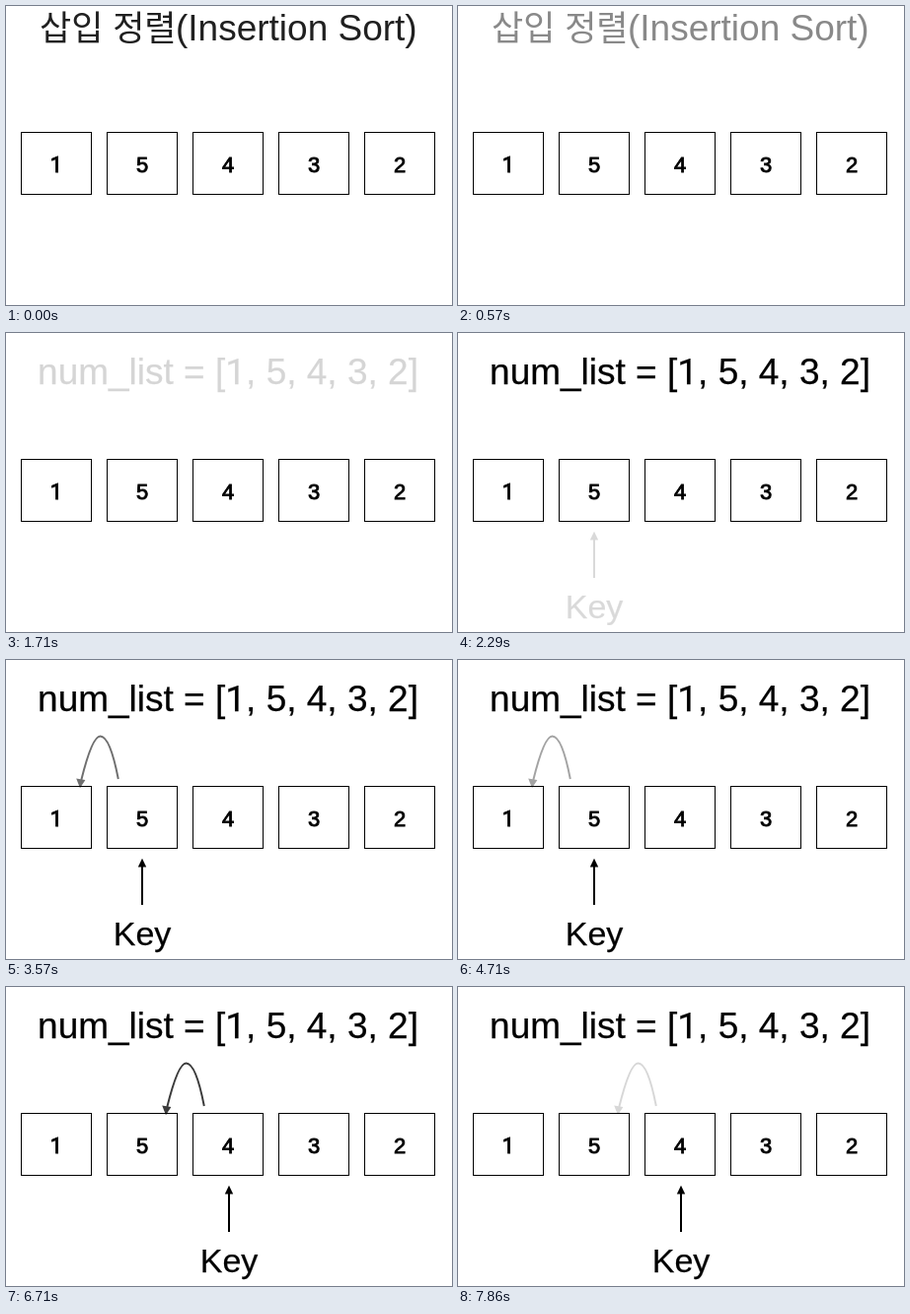
An HTML page for the animation above (8 s loop, 452 by 304 pixels).

```html
<!DOCTYPE html>
<html lang="ko">
<head>
<meta charset="utf-8">
<title>삽입 정렬</title>
<style>
  /* Seconds into the loop, advanced seven times per second */
  @property --t { syntax: "<number>"; inherits: true; initial-value: 0; }
  @keyframes tick { from { --t: 0; } to { --t: 8; } }

  html, body { margin: 0; width: 100%; height: 100%; overflow: hidden; background: #fff; }
  svg {
    display: block;
    width: 452px;
    height: 304px;
    font-family: "Liberation Sans", Arial, sans-serif;
    animation: tick 8s steps(56) -5ms infinite;
  }
  .box { fill: #fff; stroke: #000; }
  .digit { font-size: 22px; text-anchor: middle; stroke: #000; stroke-width: .85; }
  .one { font-family: Roboto, sans-serif; }
  .line { fill: none; stroke: #000; stroke-width: 2; }
  .heading { font-size: 37px; }
  .hangul { font: 35px "Noto Sans CJK KR", "Noto Sans CJK", sans-serif; }
  .hangul tspan { font-family: "Liberation Sans", Arial, sans-serif; }

  .title { opacity: calc(.87 - .72 * var(--t)); }
  .list, .key text { text-anchor: middle; stroke: #000; stroke-width: .25; }
  .list { opacity: calc((var(--t) - 1.66) / .34); }
  .key {
    opacity: calc((var(--t) - 2.185) / .7);
    transform: translateX(calc(44px * (1 - cos(3.14159 * clamp(0, var(--t) - 5.07, 1)))));
  }
  .key text { font-size: 34px; }
  .hop { opacity: calc(min(var(--t) - var(--in), var(--out) - var(--t)) / .7); }
  .first { --in: 3.18; --out: 4.965; }
  .second { --in: 6.18; --out: 7.965; }
</style>
</head>
<body>
<svg viewBox="0 0 452 304">
  <defs>
    <rect id="box" class="box" x="15.5" y="128.5" width="71" height="63"/>
    <g id="arc">
      <path class="line" d="M113.8 121C108 91 101.5 77.5 95.5 77.5C89 77.5 82.5 97 76.3 122"/>
      <path d="M71.2 120.6L80.4 122L75 130.3Z"/>
    </g>
  </defs>

  <g class="title">
    <text class="hangul" x="34" y="35">삽입<tspan> </tspan>정렬</text>
    <text class="heading" x="172" y="35">(Insertion Sort)</text>
  </g>
  <text class="heading list" x="225" y="52">num_list = [<tspan class="one">1</tspan>, 5, 4, 3, 2]</text>

  <use href="#box"/>
  <use href="#box" x="87"/>
  <use href="#box" x="174"/>
  <use href="#box" x="261"/>
  <use href="#box" x="348"/>
  <g class="digit">
    <text class="one" x="51" y="169">1</text>
    <text x="138" y="169">5</text>
    <text x="225" y="169">4</text>
    <text x="312" y="169">3</text>
    <text x="399" y="169">2</text>
  </g>

  <g class="key">
    <path class="line" d="M138 249V209"/>
    <path d="M138 201.8L142.2 210.5H133.8Z"/>
    <text x="138" y="289.5">Key</text>
  </g>

  <g class="hop first"><use href="#arc"/></g>
  <g class="hop second"><use href="#arc" x="87"/></g>
</svg>
</body>
</html>
```
